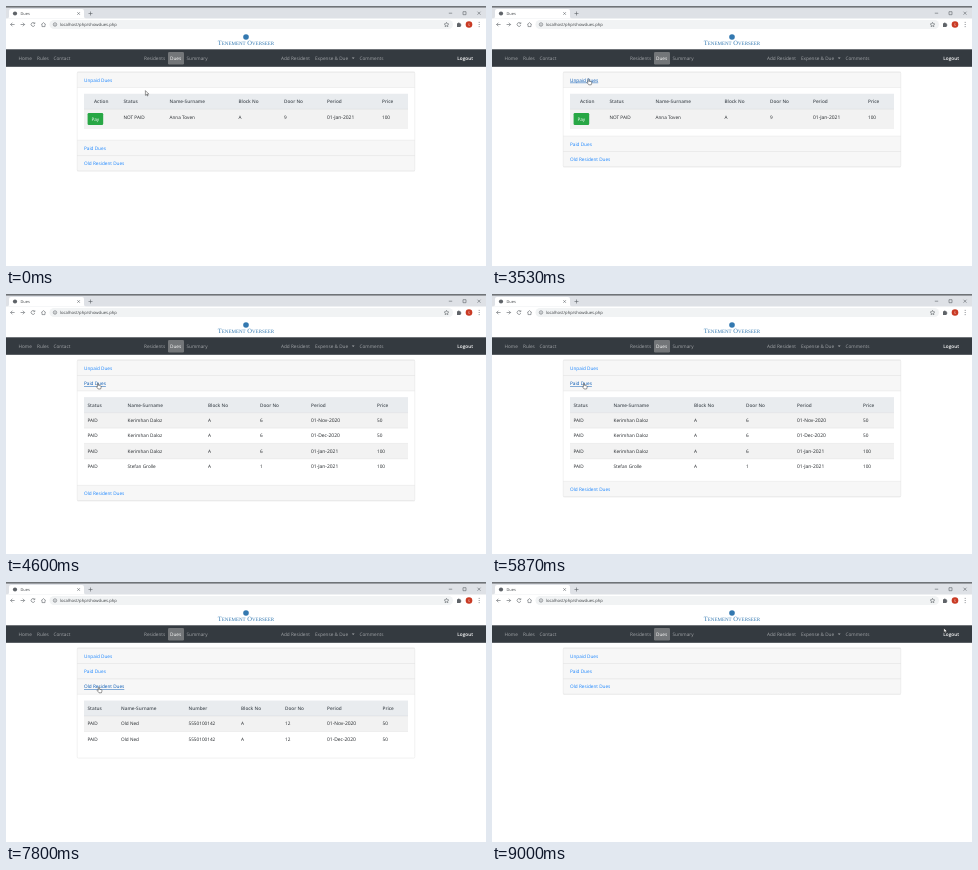
An HTML page for the animation above (9.07 s loop, 480 by 260 pixels).

```html
<!DOCTYPE html>
<html lang="en">
<head>
<meta charset="utf-8">
<title>Dues</title>
<style>
  html, body { margin: 0; width: 100%; height: 100%; overflow: hidden; background: #fff; }
  svg { display: block; }
  text { font: 4.7px "Open Sans", "Noto Sans", sans-serif; fill: #212529; text-rendering: geometricPrecision; white-space: pre; }
  .url { font-size: 4.2px; fill: #3c4043; }
  .tab { font-size: 3.9px; fill: #3c4043; }
  .avatar { font-size: 3.4px; fill: #fff; text-anchor: middle; }
  .brand { font: 6.5px "Liberation Serif", serif; font-variant: small-caps; fill: #3378b0; text-anchor: middle; }
  .nav { fill: #a2a5a8; }
  .on { fill: #fff; }
  .head { font-weight: 600; fill: #495057; }
  .date { font-size: 4.95px; }
  .link { fill: #1a85ff; }
  .link.hover { fill: #0056b3; text-decoration: underline; }
  .icon { fill: none; stroke: #5f6368; stroke-width: .6; }
  .edge { fill: none; stroke: #dfdfdf; stroke-width: .4; }
  .cursor { fill: #fff; stroke: #000; stroke-width: .4; stroke-linejoin: round; }
</style>
</head>
<body>
<svg id="stage" width="480" height="260" viewBox="0 0 480 260">
  <!-- browser window -->
  <rect width="480" height="12.5" fill="#dee1e6"/>
  <rect width="480" height="1.6" fill="#6f7377"/>
  <path d="M1 12.5Q3 12.5 3 10.5V5Q3 3 5 3H76Q78 3 78 5V10.5Q78 12.5 80 12.5Z" fill="#fff"/>
  <circle cx="9" cy="7.5" r="2.1" fill="#5f6368"/>
  <text class="tab" x="14.5" y="8.9">Dues</text>
  <path class="icon" d="M71.3 6.2l2.6 2.6m0-2.6l-2.6 2.6M82.5 7.5h4m-2-2v4M442.8 7.2h3.4M457 5.7h3v3h-3zM471.5 5.7l3 3m0-3l-3 3"/>
  <rect x="43.5" y="14" width="403.500" height="9" rx="4.500" fill="#f1f3f4"/>
  <path class="icon" d="M8.600 18.500h-4m1.800-1.800l-1.800 1.800 1.800 1.800M14.600 18.500h4m-1.800-1.800l1.800 1.800-1.800 1.800M28.500 17.300a1.900 1.900 0 1 0 .3 1.800M28.800 16.300v1.400h-1.400M35.200 18.600l2.300-2 2.300 2M36 18.300v2.300h3v-2.300"/>
  <circle class="icon" cx="49" cy="18.500" r="1.700"/>
  <path class="icon" d="M49 18.200v1.200"/>
  <text class="url" x="54" y="20">localhost/php/showdues.php</text>
  <path class="icon" d="M440.500 16.300l.7 1.500 1.600.2-1.200 1.100.3 1.600-1.400-.8-1.400.8.3-1.600-1.200-1.100 1.600-.2z"/>
  <path d="M451 17.300h1a.8.8 0 0 1 1.600 0h1v1a.8.8 0 0 1 0 1.600v1H451z" fill="#5f6368"/>
  <circle cx="463" cy="18.500" r="3.300" fill="#c93a24"/>
  <text class="avatar" x="463" y="19.800">S</text>
  <path d="M473.200 16.300v.01m0 2.190v.01m0 2.190v.01" stroke="#5f6368" stroke-linecap="round" stroke-width=".9"/>

  <!-- site header -->
  <circle cx="240" cy="31" r="2.800" fill="#3378b0"/>
  <text class="brand" x="240" y="39.400">Tenement Overseer</text>
  <rect y="43.300" width="480" height="17.500" fill="#343a40"/>
  <rect x="162" y="46" width="16" height="12.500" rx="1.200" fill="#737679"/>
  <g id="nav"></g>
  <path d="M345.800 51.600h2.800l-1.400 1.500z" fill="#a2a5a8"/>

  <g id="accordion"></g>
  <rect id="frame" class="edge" x="71.200" y="66.100" width="337.600" rx="1.250"/>
  <g id="pointer" class="cursor">
    <path id="arrow" d="M0 0V4.700L1.100 3.700 1.900 5.400 2.600 5.100 1.900 3.500H3.400Z"/>
    <path id="hand" d="M-.5.400Q0-.300.500.400V2.200L2.700 2.700Q3.300 2.900 3.100 4.200L2.600 5.800H.200L-1.600 3.500Q-1.400 2.700-.5 3.300Z"/>
  </g>
</svg>
<script>
const LOOP = 9070, TOP = 66.1, HEADER = 15.4, ROW = 15.35, PAD = 6.25;
const $ = id => document.getElementById(id);

function add(parent, tag, attrs, content = "") {
  const node = document.createElementNS("http://www.w3.org/2000/svg", tag);
  for (const name in attrs) node.setAttribute(name, attrs[name]);
  node.textContent = content;
  return parent.appendChild(node);
}
// Text is placed by the vertical centre of its line.
const label = (parent, x, middle, content, cls = "") =>
  add(parent, "text", { x, y: middle + 1.65, class: cls }, content);
const box = (parent, x, y, width, height, fill, rx = 0) =>
  add(parent, "rect", { x, y, width, height, fill, rx });

[[12.5, "Home"], [31, "Rules"], [47.5, "Contact"], [138, "Residents"], [164, "Dues", "on"],
 [180.5, "Summary"], [275, "Add Resident"], [309, "Expense & Due"], [353.5, "Comments"],
 [451.3, "Logout", "on"]]
  .forEach(([x, name, cls = ""]) => label($("nav"), x, 52.4, name, "nav " + cls));
$("nav").lastChild.style.fontWeight = 600;

const panels = [
  { title: "Unpaid Dues", open: -1000, close: 3500, rowHeight: 19.6, pay: true,
    columns: [88, 117.5, 163.5, 232.5, 278, 321, 376],
    heads: ["Action", "Status", "Name-Surname", "Block No", "Door No", "Period", "Price"],
    rows: [["", "NOT PAID", "Anna Toven", "A", "9", "01-Jan-2021", "100"]] },
  { title: "Paid Dues", open: 4240, close: 5850, rowHeight: ROW,
    columns: [81.5, 121.5, 202, 254, 305, 371],
    heads: ["Status", "Name-Surname", "Block No", "Door No", "Period", "Price"],
    rows: [["PAID", "Kerimhan Daloz", "A", "6", "01-Nov-2020", "50"],
           ["PAID", "Kerimhan Daloz", "A", "6", "01-Dec-2020", "50"],
           ["PAID", "Kerimhan Daloz", "A", "6", "01-Jan-2021", "100"],
           ["PAID", "Stefan Grolle", "A", "1", "01-Jan-2021", "100"]] },
  { title: "Old Resident Dues", open: 6570, close: 8040, rowHeight: ROW,
    columns: [81.5, 115, 182.5, 235, 279, 321, 376.5],
    heads: ["Status", "Name-Surname", "Number", "Block No", "Door No", "Period", "Price"],
    rows: [["PAID", "Old Ned", "5550100142", "A", "12", "01-Nov-2020", "50"],
           ["PAID", "Old Ned", "5550100142", "A", "12", "01-Dec-2020", "50"]] }
];

function buildPanel(panel) {
  const { columns, rows, rowHeight } = panel;
  const group = panel.group = add($("accordion"), "g", {});
  box(group, 71.2, 0, 337.6, HEADER, "#f7f7f7");
  add(group, "path", { class: "edge", d: `M71.2 ${HEADER}h337.6M71.2 0h337.6` });
  panel.link = label(group, 78, 7.9, panel.title, "link");

  const body = panel.body = add(group, "svg", { y: HEADER, width: 480, overflow: "hidden" });
  box(body, 78, PAD, 324, 15.6, "#e9ecef");
  box(body, 78, PAD + 15, 324, .6, "#dee2e6");
  panel.heads.forEach((name, i) => label(body, columns[i], PAD + 7.8, name, "head"));
  rows.forEach((cells, r) => {
    const y = PAD + 15.6 + r * rowHeight;
    if (r % 2 === 0) box(body, 78, y, 324, rowHeight, "#f2f2f2");
    add(body, "path", { class: "edge", d: `M78 ${y}h324` });
    cells.forEach((cell, i) =>
      label(body, columns[i], y + 7.7, cell, /-20/.test(cell) ? "date" : ""));
  });
  if (panel.pay) {
    box(body, 81.6, PAD + 19.3, 15.6, 11.9, "#28a745", 1.2);
    label(body, 85.4, PAD + 25.2, "Pay", "on");
  }
  panel.height = PAD * 2 + 20.6 + rows.length * rowHeight;
}
panels.forEach(buildPanel);

const clamp = v => Math.max(0, Math.min(1, v));
const smooth = v => v * v * (3 - 2 * v);

// The CSS "ease" curve, cubic-bezier(.25, .1, .25, 1), solved by bisection.
function ease(x) {
  const bezier = (a, b, s) => 3 * a * s * (1 - s) ** 2 + 3 * b * s * s * (1 - s) + s ** 3;
  let low = 0, high = 1;
  for (let i = 0; i < 16; i++) {
    const mid = (low + high) / 2;
    if (bezier(.25, .25, mid) < x) low = mid; else high = mid;
  }
  return x <= 0 ? 0 : x >= 1 ? 1 : bezier(.1, 1, low);
}
const slide = (t, start) => ease(clamp((t - start) / 350));

// Pointer stops: time, x, y.
const stops = [
  [0, 139.4, 84.6], [170, 139.4, 84.6], [600, 64, 88], [770, 64, 88], [890, 84, 102],
  [1000, 92.8, 80], [1130, 92.8, 80], [1330, 96, 72.8], [2100, 96, 72.8], [2130, 96.6, 73],
  [3830, 96.6, 73], [4070, 92, 89.2], [6130, 92, 89.2], [6330, 90.7, 98.4], [6400, 90.7, 98.4],
  [6540, 92, 104.6], [7170, 92, 104.6], [7330, 92.8, 105], [8330, 92.8, 105],
  [8930, 451, 47], [9000, 451.8, 45.9], [LOOP, 451.8, 45.9]
];
function pointerAt(t) {
  const i = stops.findIndex(stop => stop[0] > t);
  const [t0, x0, y0] = stops[i - 1], [t1, x1, y1] = stops[i];
  const p = smooth((t - t0) / (t1 - t0));
  return [x0 + (x1 - x0) * p, y0 + (y1 - y0) * p];
}

function draw(t) {
  const [x, y] = pointerAt(t);
  let top = TOP, overLink = false;
  for (const { group, body, link, title, height, open, close } of panels) {
    const shown = height * (slide(t, open) - slide(t, close));
    const right = 78 + title.length * 2.5;
    const hover = x > 78 && x < right && Math.abs(y - top - 7.9) < 3.4;
    group.setAttribute("transform", `translate(0 ${top})`);
    body.setAttribute("height", shown);
    body.style.display = shown > 0 ? "" : "none";
    link.classList.toggle("hover", hover);
    overLink ||= hover;
    top += HEADER + shown;
  }
  $("frame").setAttribute("height", top - TOP);
  $("pointer").setAttribute("transform", `translate(${x} ${y})`);
  $("arrow").style.display = overLink ? "none" : "";
  $("hand").style.display = overLink ? "" : "none";
}

const started = performance.now();
function tick() {
  draw((performance.now() - started) % LOOP);
  requestAnimationFrame(tick);
}
tick();
</script>
</body>
</html>
```
